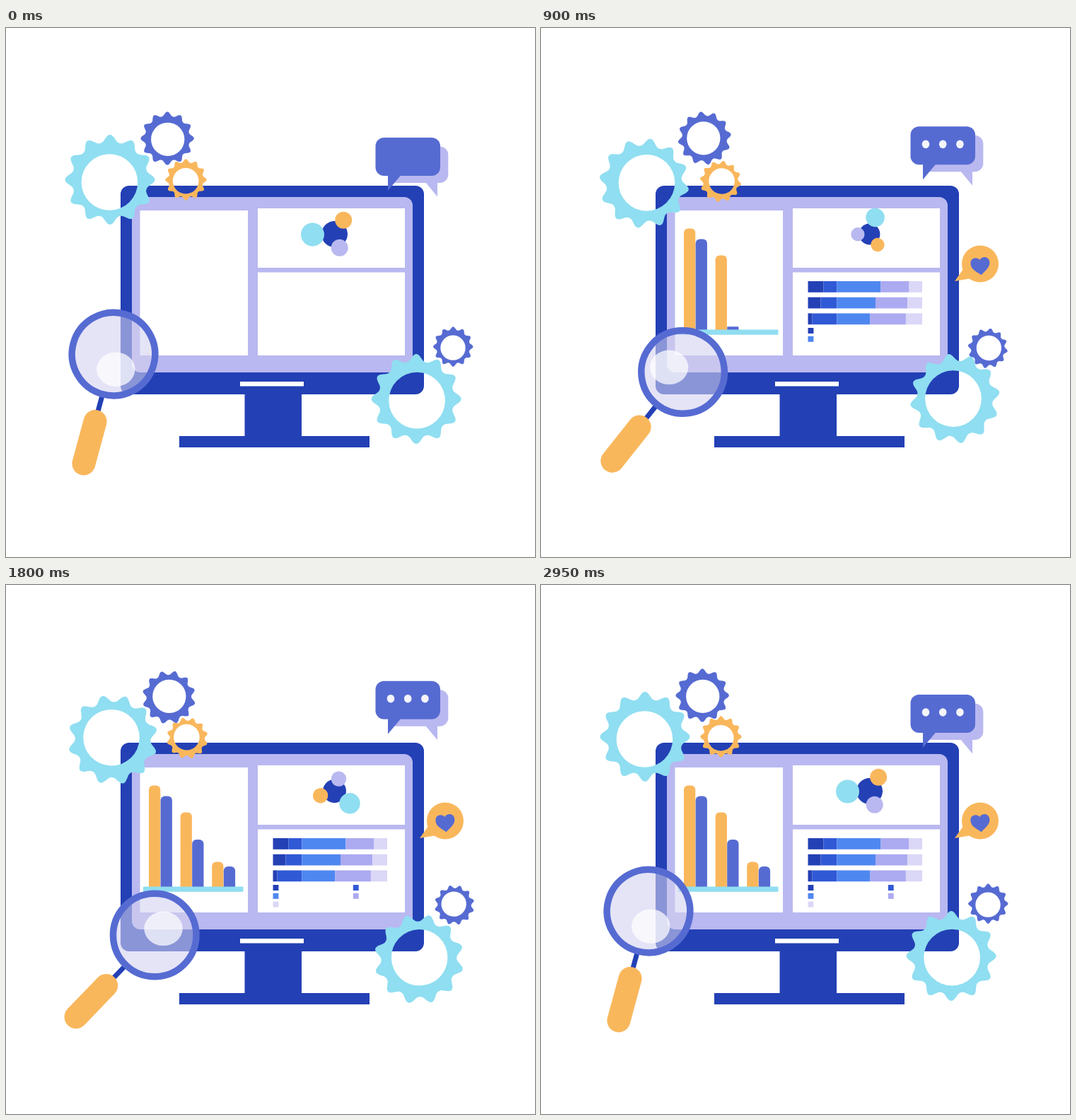
Write an HTML page with a canvas that moves like this. It is 748 by 748 pixels and loops after 3 s.

```html
<!DOCTYPE html>
<html lang="en">
<head>
<meta charset="utf-8">
<title>Data analysis</title>
<style>
  html, body { margin: 0; width: 100%; height: 100%; overflow: hidden; background: #fff; }
  canvas { display: block; width: 100vw; height: 100vh; }
</style>
</head>
<body>
<canvas id="stage" width="748" height="748"></canvas>
<script>
const ctx = document.getElementById('stage').getContext('2d');
const NAVY = '#2340b5', BLUE = '#566bd2', LILAC = '#b9b8f0', CYAN = '#90def1', ORANGE = '#f9b75c';
const SHADES = [NAVY, '#3059d6', '#4f87f0', '#acaaf0', '#dad7f7'];
const LOOP = 3000, STEP = 50, CYCLE = 2950, RAD = Math.PI / 180, TAU = 2 * Math.PI;

const ramp = (t, start, length) => Math.max(0, Math.min(1, (t - start) / length));
// Rises to 1 halfway through the cycle, then falls back to 0.
const swing = t => Math.min(t / 1450, (CYCLE - t) / 1500);
const polar = (r, deg) => [r * Math.cos(deg * RAD), r * Math.sin(deg * RAD)];

function fill(color, x, y, w, h, r = 0) {
  ctx.fillStyle = color;
  ctx.beginPath();
  ctx.roundRect(x, y, w, h, r);
  ctx.fill();
}
function oval(color, x, y, rx, ry = rx) {
  ctx.fillStyle = color;
  ctx.beginPath();
  ctx.ellipse(x, y, rx, ry, 0, 0, TAU);
  ctx.fill();
}
function triangle(color, x, y, dx1, dy1, dx2, dy2) {
  ctx.fillStyle = color;
  ctx.beginPath();
  ctx.moveTo(x, y);
  ctx.lineTo(x + dx1, y + dy1);
  ctx.lineTo(x + dx2, y + dy2);
  ctx.fill();
}
// Draws in a local frame: moved, turned by degrees, scaled.
function within(x, y, deg, sx, sy, draw) {
  ctx.save();
  ctx.translate(x, y);
  ctx.rotate(deg * RAD);
  ctx.scale(sx, sy);
  draw();
  ctx.restore();
}

// Rim and hole sit slightly off the pivot, so the gear wobbles as it turns.
function gear(color, x, y, radius, dir, turn) {
  within(x, y, dir * turn, 1, 1, () => {
    const [ox, oy] = polar(0.05 * radius, 228 - 20 * dir);
    const [hx, hy] = polar(0.03 * radius, 160);
    const inner = 0.627 * radius;
    ctx.fillStyle = color;
    ctx.beginPath();
    for (let a = 0; a < 360; a += 1.5) {
      const tooth = ((1 + Math.cos(12 * a * RAD)) / 2) ** 1.3;
      const [px, py] = polar(radius * (0.84 + 0.16 * tooth), a);
      ctx.lineTo(ox + px, oy + py);
    }
    ctx.closePath();
    ctx.moveTo(hx + inner, hy);
    ctx.arc(hx, hy, inner, 0, TAU);
    ctx.fill('evenodd');
  });
}

function monitor() {
  fill(NAVY, 162, 223, 429, 295, 12);
  fill(LILAC, 178, 239, 397, 248, 12);
  fill('#fff', 189.5, 258, 152.5, 205);
  fill('#fff', 356, 255, 208, 84);
  fill('#fff', 356, 345.5, 208, 117.5);
  fill(NAVY, 337.5, 506, 80.5, 72);
  fill(NAVY, 245, 577, 269, 16);
  fill('#fff', 331, 500, 90, 6.5);
}

// Three pairs of columns, growing one after another.
function columns(t) {
  for (let i = 0; i < 6; i++) {
    const pair = i >> 1, blue = i % 2;
    const height = blue ? 129 - 73.3 * pair + 11.8 * pair ** 2 : 144 - 22 * pair - 16 * pair ** 2;
    within(202 + 44.6 * pair + 16.6 * blue, 427.5, 0, 1, ramp(t, 35 + 281 * i, 281), () =>
      fill(blue ? BLUE : ORANGE, 0, -height, 16.3, height, [6, 6, 0, 0]));
  }
  fill(CYAN, 194, 426.5, 141.5 * ramp(t, 0, 300), 7.2, 1);
}

function rows(t) {
  for (let i = 0; i < 3; i++) {
    const cuts = [0, 22 - 4 * i * i, 41, 103 - 7.5 * i, 143 - 2.3 * i, 161.5];
    within(377.5, 358 + 22.7 * i, 0, ramp(t, 217 - 70 * i, 520), 1, () =>
      SHADES.forEach((c, k) => fill(c, cuts[k], 0, cuts[k + 1] - cuts[k], 15.8)));
  }
  // Legend squares fill the first column, then the second.
  for (let i = 0; i < 5 && t >= 500 + 320 * i; i++)
    fill(SHADES[2 * i % 5], 377.5 + 113.3 * Math.floor(i / 3), 424 + 11.8 * (i % 3), 7.9, 8);
}

function molecule(t) {
  const size = 0.875 + 0.125 * (2 * Math.abs(1 - 2 * (2 * t / CYCLE % 1)) - 1);
  within(464.5, 291.5, 360 * t / CYCLE, size, size, () => {
    oval(NAVY, 0, 0, 18.5);
    oval(CYAN, -31, 0.5, 16.5);
    oval(ORANGE, 12.7, -19.7, 12);
    oval(LILAC, 7.2, 19.3, 12);
  });
}

function chat(t) {
  within(0, -25.2 * swing(t), 0, 1, 1, () => {
    fill(LILAC, 540, 167.5, 85.3, 51.5, 12);
    triangle(LILAC, 610, 238.5, -17, -20.5, 0, -20.5);
    fill(BLUE, 522.5, 155, 91.5, 54, 12);
    triangle(BLUE, 540, 230, 0, -22, 18.5, -22);
    for (let i = 0; i < 3 && t >= 200 + 250 * i; i++) oval('#f5f5fc', 544 + 24.2 * i, 180, 5.3, 5.8);
  });
}

// Pops out of the tip of its tail.
function heart(t) {
  const size = ramp(t, 200, 250);
  within(585, 358, 0, size, size, () => {
    oval(ORANGE, 36, -24.5, 26);
    triangle(ORANGE, 0, 0, 12, -17, 23, -4);
    within(36.3, -21.5, -6, 1, 1, () => {
      ctx.fillStyle = BLUE;
      ctx.beginPath();
      for (const side of [-1, 1]) {
        const w = 13.5 * side;
        ctx.moveTo(0, -8.5);
        ctx.bezierCurveTo(3 * side, -13.5, w, -13.5, w, -4);
        ctx.bezierCurveTo(w, 4, 5 * side, 8, 0, 12.8);
      }
      ctx.fill();
    });
  });
}

function magnifier(t) {
  const start = 15.2, tilt = 37.4 * swing(t);
  within(114.5, 592, start + tilt, 1, 1, () => {
    ctx.translate(1.85, -6.5);
    fill(NAVY, -3.5, -70, 7, 28);
    fill(ORANGE, -16.5, -47.3, 33, 94.6, 16.5);
    ctx.translate(0, -129.7);
    oval('rgba(211,209,240,.59)', 0, 0, 55);
    ctx.strokeStyle = BLUE;
    ctx.lineWidth = 9.5;
    ctx.beginPath();
    ctx.arc(0, 0, 58.75, 0, TAU);
    ctx.stroke();
    // The glint circles with the lens but stays upright.
    ctx.rotate(-start * RAD);
    const [gx, gy] = polar(19, 75 + 360 * t / CYCLE);
    within(gx - 1.6, gy + 3.2, -tilt, 1, 1, () => oval('rgba(255,255,255,.72)', 0, 0, 27.2, 24.2));
  });
}

function draw(now) {
  const t = Math.floor((now % LOOP) / STEP) * STEP;
  const turn = 360 * ramp(t, 0, 2900);
  ctx.fillStyle = '#fff';
  ctx.fillRect(0, 0, 748, 748);
  monitor();
  columns(t);
  rows(t);
  molecule(t);
  gear(CYAN, 148.2, 217.4, 63.5, -1, turn);
  gear(BLUE, 229.8, 157, 37.7, 1, turn);
  gear(ORANGE, 255, 215.9, 29.2, -1, turn);
  gear(BLUE, 632.8, 451.9, 28.2, -1, turn);
  gear(CYAN, 582.9, 526, 63.5, 1, turn);
  chat(t);
  heart(t);
  magnifier(t);
  requestAnimationFrame(() => draw(performance.now()));
}
draw(0);
</script>
</body>
</html>
```
